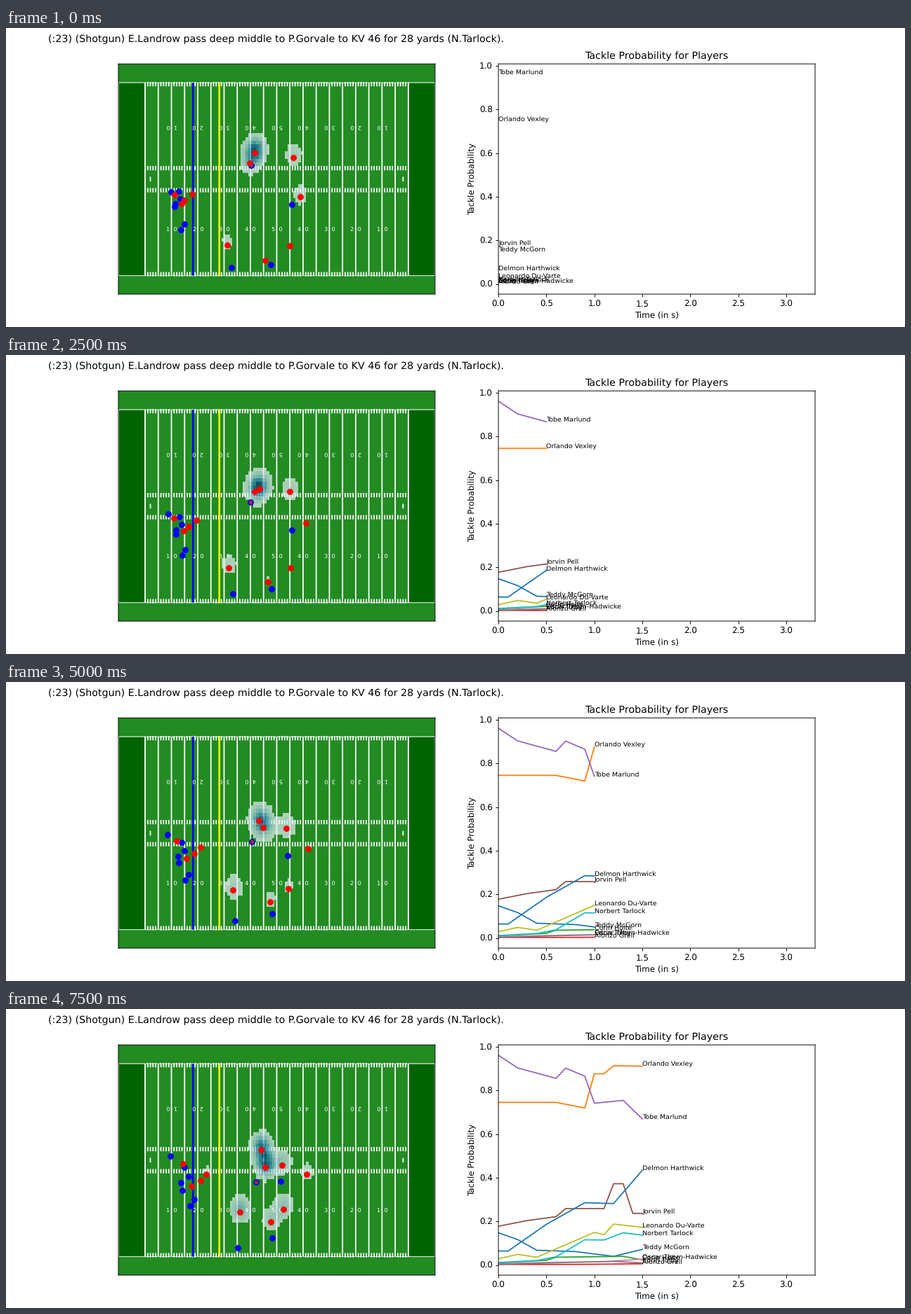
A matplotlib script for the animation above (8 s loop, 1280x427 px).

```python
import numpy as np
import matplotlib.pyplot as plt
from matplotlib.animation import FuncAnimation
from matplotlib.patches import Rectangle

# Soft, unsnapped edges everywhere
plt.rcParams.update({"path.snap": False, "text.hinting": "none"})

FRAMES, INTERVAL = 16, 500
DPI = 1280 / 15
LENGTH, WIDTH = 120, 53.3
XLIM, YLIM = (-0.15, 120.15), (-5.1, 58.5)
SIGMA = 2.2    # spread of a heat spot in yards

# Runs in stage pixels: start x, y, end x, y and sideways bend
DEFENSE = [
    (354, 178, 368.5, 225.5, 3),
    (347, 193, 363, 201, 3),
    (409, 184.5, 392.5, 223, 0),
    (418.5, 241, 428, 236, 6),
    (404, 311, 394.5, 286, 4),
    (369, 331.5, 377, 303.5, 2),
    (315, 309.5, 332.5, 290, -3),
    (265, 236.5, 284.5, 235.5, 0),
    (254, 245.5, 277, 244.5, -1),
    (249.5, 251, 263.5, 252.5, -1),
    (240, 238, 252, 221, -5),
]
OFFENSE = [
    (348.5, 196, 356, 247, -3.5),
    (406.5, 251.5, 391, 246, 5),
    (376.5, 337.5, 379, 326.5, 1),
    (321, 341.5, 330, 340.5, -1),
    (235, 233.5, 234, 209.5, -4.5),
    (246, 233, 254, 226, -1),
    (248, 243.5, 260, 239, -2),
    (241, 251, 248.5, 248, -1),
    (239.5, 255, 251, 259, -1),
    (254, 280, 268, 272, -3),
    (248.5, 287.5, 262, 280.5, -2),
]
# Defender: radius of the heat at start and end, bend; negative is hidden
REACH = {
    0: (5.0, 4.9, 0), 1: (4.2, 4.8, 0), 2: (3.1, 3.6, 0),
    3: (2.6, 2.2, -2.5), 4: (-2.5, 3.6, 0), 5: (-1, 3.4, 0),
    6: (1.9, 4.2, 0), 7: (-6, 1.5, 0),
}
# Key points: tenths of a second to thousandths
PROBS = {
    "Teddy McGorn": {0: 148, 2: 117, 4: 68, 8: 62, 12: 40, 15: 72},
    "Orlando Vexley": {0: 746, 6: 746, 9: 720, 10: 877, 11: 877,
                       12: 914, 15: 912},
    "Corin Holte": {0: 10, 5: 22, 6: 36, 13: 40, 15: 24},
    "Alonzo Grell": {0: 3, 8: 3, 15: 6},
    "Tobe Marlund": {0: 962, 2: 904, 6: 856, 7: 903, 9: 866,
                     10: 742, 13: 755, 15: 670},
    "Jorvin Pell": {0: 178, 3: 204, 6: 222, 7: 259, 11: 259,
                    12: 373, 13: 373, 14: 237},
    "Oscar Thorn-Hadwicke": {0: 6, 5: 12, 11: 16, 15: 27},
    "Edrin Tolby": {0: 4, 12: 17, 15: 10},
    "Leonardo Du-Varte": {0: 29, 2: 49, 4: 36, 10: 150, 11: 139,
                          12: 188, 15: 173},
    "Norbert Tarlock": {0: 12, 4: 21, 6: 38, 9: 116, 11: 115,
                        13: 148, 15: 137},
    "Delmon Harthwick": {0: 65, 1: 64, 5: 187, 9: 286, 12: 282, 15: 435},
}


def bow(start, end, bend, s, power=1.0):
    """Move from start to end, pushed aside by bend half way."""
    return start + (end - start) * s ** power + bend * 4 * s * (1 - s)


def positions(runs, i):
    """Places in yards of all runs at frame i."""
    x0, y0, x1, y1, bend = np.array(runs, float).T
    s = i / (FRAMES - 1)
    x = bow(x0, x1, bend, s, 1.15)
    y = bow(y0, y1, 0, s, 1.15)
    return np.column_stack([
        XLIM[0] + (x - 160) / 450.9 * (XLIM[1] - XLIM[0]),
        YLIM[0] + (380 - y) / 328.8 * (YLIM[1] - YLIM[0])])


def lines(ax, xs, y0, y1, color="white", lw=1.5, z=1):
    ax.vlines(xs, y0, y1, color=color, lw=lw, zorder=z)


def draw_field(ax):
    ax.set_facecolor("forestgreen")
    for x, w, color in [(0, LENGTH, "forestgreen"),
                        (0, 10, "darkgreen"), (110, 10, "darkgreen")]:
        ax.add_patch(Rectangle((x, 0), w, WIDTH, fc=color, ec="white",
                               lw=0.7, zorder=0))
    lines(ax, range(10, 111, 5), 0, WIDTH)
    ticks = [x for x in range(11, 110) if x % 5]
    for y in (0.4, 23.6, 29.7, 52.9):
        lines(ax, ticks, y - 0.6, y + 0.6)
    lines(ax, [12, 108], 26, 27.3)
    lines(ax, [28.2], 0, WIDTH, "blue", 2.2, 1.5)
    lines(ax, [38.2], 0, WIDTH, "yellow", 2.2, 1.5)
    for x in range(20, 101, 10):
        tens = min(x, LENGTH - x) // 10 - 1
        for y, angle in ((12.5, 0), (41.4, 180)):
            ax.text(x + 0.1, y, f"{tens}  0", color="white", fontsize=7,
                    ha="center", va="center", rotation=angle)
    ax.set(xlim=XLIM, ylim=YLIM, xticks=[], yticks=[])


gx, gy = np.meshgrid(np.arange(120) + 0.7, np.arange(53) + 0.75)
grain = np.exp(0.06 * np.random.default_rng(4).standard_normal(gx.shape))


def heat_map(i):
    """Sum of spots just ahead of the defenders, cut off at 1."""
    spots = positions(DEFENSE, i) + (0.3, 0.75)
    total = np.zeros_like(gx)
    for k, reach in REACH.items():
        r = bow(*reach, i / (FRAMES - 1))
        dist2 = (gx - spots[k, 0]) ** 2 + (gy - spots[k, 1]) ** 2
        total += np.exp((r * abs(r) - dist2) / (2 * SIGMA ** 2))
    total *= grain
    return np.ma.masked_where(total < 1, total / total.max())


fig, (field, chart) = plt.subplots(1, 2, figsize=(15, 427 / DPI), dpi=DPI)
fig.text(60 / 1280, 1 - 20.3 / 427,
         "(:23) (Shotgun) E.Landrow pass deep middle to P.Gorvale "
         "to KV 46 for 28 yards (N.Tarlock).", fontsize=12)

heat = field.imshow(heat_map(0), cmap="Blues", vmin=0, vmax=1, alpha=0.7,
                    origin="lower", aspect="auto", interpolation="nearest",
                    extent=(0.2, 120.2, 0.25, 53.25), zorder=2)
draw_field(field)

groups = []
for runs, color, size in ((OFFENSE, "blue", 42), (DEFENSE, "red", 42),
                          (OFFENSE[:1], "brown", 14)):
    dots = field.scatter(*positions(runs, 0).T, c=color, s=size, zorder=4)
    groups.append((dots, runs))

chart.set(xlim=(0, 3.3), ylim=(-0.046, 1.0095), xlabel="Time (in s)",
          ylabel="Tackle Probability", title="Tackle Probability for Players")
steps = np.arange(FRAMES)
series = []
for n, (name, keys) in enumerate(PROBS.items()):
    probs = np.interp(steps, list(keys), list(keys.values())) / 1000
    line, = chart.plot([], [], color=f"C{n % 10}")
    series.append((line, chart.text(0, 0, name, fontsize=8), probs))


def draw(i):
    heat.set_data(heat_map(i))
    for dots, runs in groups:
        dots.set_offsets(positions(runs, i))
    for line, label, probs in series:
        line.set_data(steps[:i + 1] / 10, probs[:i + 1])
        label.set_position((i / 10, probs[i]))


anim = FuncAnimation(fig, draw, frames=FRAMES, interval=INTERVAL, repeat=True)
plt.show()
```
